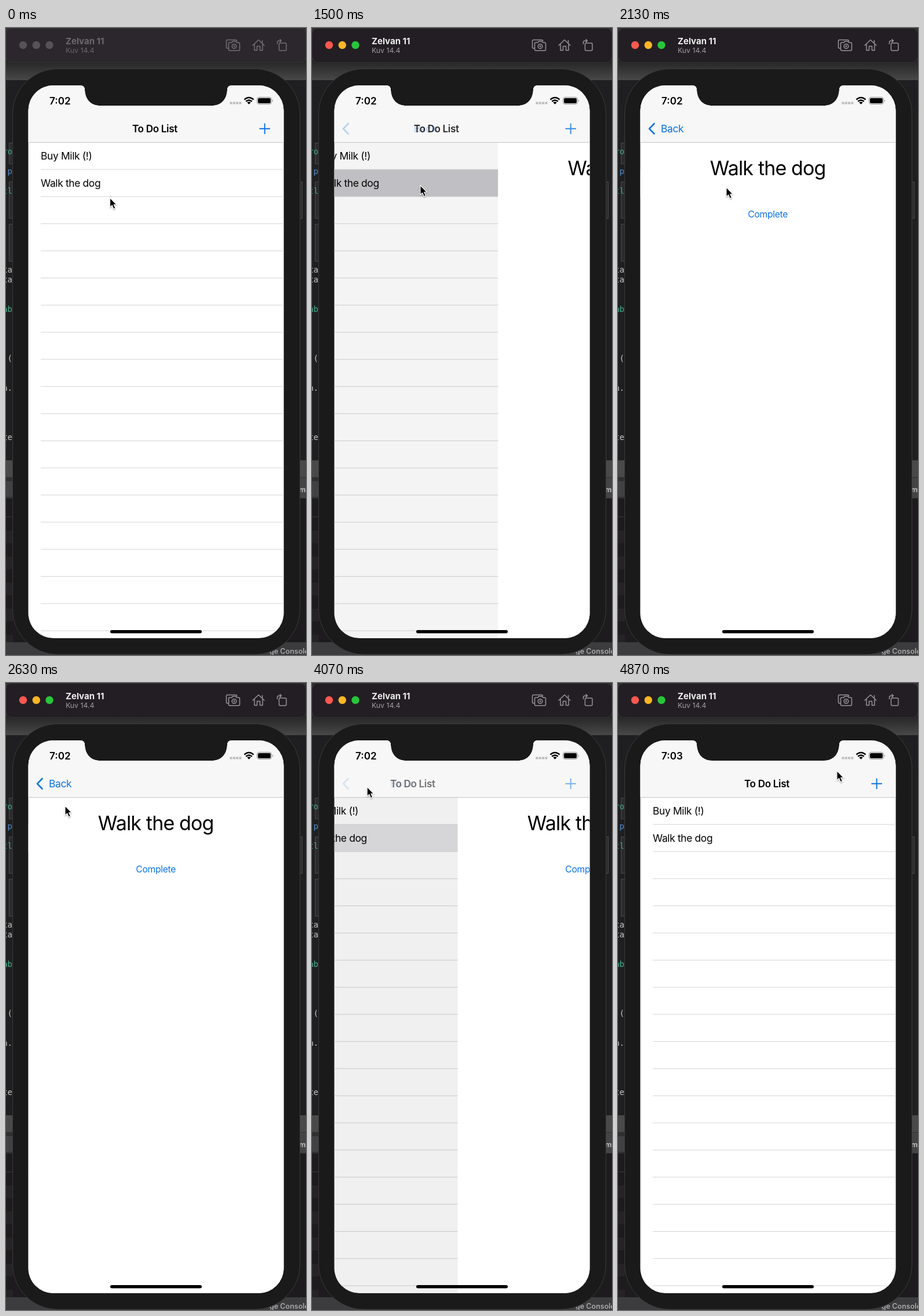
An HTML page for the animation above (4910 ms loop, 518x1082 px).

```html
<!DOCTYPE html>
<html lang="en">
<head>
<meta charset="utf-8">
<title>To Do List</title>
<style>
  html, body { margin: 0; width: 100%; height: 100%; overflow: hidden; background: #1f1f21; }
  svg { display: block; width: 100vw; height: 100vh; }
  text { font-family: Inter, sans-serif; font-size: 17.4px; letter-spacing: -.02em; white-space: pre; }
  .code { font: 14px "DejaVu Sans Mono", monospace; letter-spacing: 0; text-anchor: end; }
  .semi { font-weight: 600; font-size: 17.1px; }
  .line { fill: none; stroke-linecap: round; stroke-linejoin: round; }
  .blue { fill: #0b72e0; }
</style>
</head>
<body>
<svg viewBox="0 0 518 1082" preserveAspectRatio="none">
  <defs>
    <clipPath id="screen">
      <path d="M82 99H128Q136 99 136 107C137 124 147 134 163 134H355C371 134 381 124 382 107Q382 99 390 99H436A43.5 43.5 0 0 1 479.500 142.500V1009.500A43.500 43.500 0 0 1 436 1053H82A43.500 43.500 0 0 1 38.500 1009.500V142.500A43.500 43.500 0 0 1 82 99Z"/>
    </clipPath>
    <linearGradient id="shade" x2="0" y2="1">
      <stop stop-color="#242424"/><stop offset="1" stop-color="#484848"/>
    </linearGradient>
    <filter id="soft" x="-50%" y="-30%" width="220%" height="180%">
      <feDropShadow dx="0" dy="1.5" stdDeviation="1.3" flood-opacity=".35"/>
    </filter>
  </defs>

  <!-- editor behind the device -->
  <rect width="518" height="1082" fill="#1f1f21"/>
  <rect width="518" height="60" fill="#303030"/>
  <rect y="56" width="518" height="34" fill="url(#shade)"/>
  <g fill="#2b2b2d" stroke="#49494b">
    <rect x="5.500" y="198.500" width="40" height="36"/>
    <rect x="5.500" y="265.500" width="506" height="63"/>
    <rect x="5.500" y="338.500" width="40" height="64"/>
  </g>
  <g id="code" fill="#c9c9cb"></g>
  <rect y="746" width="518" height="29" fill="#494949"/>
  <rect y="775" width="518" height="37" fill="#303032"/>
  <rect y="782" width="12" height="27" fill="#414143"/>
  <rect x="500" y="776" width="18" height="35" fill="#444446"/>
  <text x="506" y="801" fill="#c6c6c6" style="font-size:12.500px;font-weight:600">mma</text>
  <rect y="812" width="518" height="248" fill="#1d1b1d"/>
  <g id="stripes" fill="#262225"></g>
  <path d="M0 843.500H12" stroke="#3b383b"/>
  <rect y="1060" width="518" height="22" fill="#3c3c3e"/>
  <text x="455" y="1080" fill="#a9a9ab" style="font-size:12.500px;font-weight:600;letter-spacing:0">ge Console</text>

  <!-- window title bar -->
  <rect id="bar" y=".5" width="518" height="59" rx="10" stroke="#3d393e" stroke-width=".7"/>
  <g id="lights">
    <circle cx="29.500" cy="29.500" r="6.700"/><circle cx="52.300" cy="29.500" r="6.700"/><circle cx="75" cy="29.500" r="6.700"/>
  </g>
  <text id="device" x="103" y="27.500" style="font-size:15px;font-weight:700;letter-spacing:0">Zelvan 11</text>
  <text id="system" x="103" y="43" style="font-size:12.300px;letter-spacing:0">Kuv 14.4</text>
  <g id="icons" class="line" stroke-width="1.500">
    <path d="M384 35H382.500Q380.500 35 380.500 33V22.500Q380.500 20.500 382.500 20.500H396.500Q398.500 20.500 398.500 22.500"/>
    <path d="M386.500 25H390L391.500 23H397L398.500 25H401.500Q403.500 25 403.500 27V37Q403.500 39 401.500 39H386.500Q384.500 39 384.500 37V27Q384.500 25 386.500 25Z"/>
    <circle cx="394" cy="31.500" r="3.800"/><circle cx="394" cy="31.500" r=".7"/>
    <path d="M426 30L436 20.500L446 30M429 28V38.500H433.500V31.500H438.500V38.500H443V28M442.500 25.500V21.500"/>
    <rect x="471.500" y="26" width="12.500" height="13" rx="2"/>
    <path d="M468.500 27.500V25Q468.500 22 471.500 22H475M473 19.500L475.500 22L473 24.500"/>
  </g>

  <!-- device -->
  <rect x="11.500" y="70.500" width="496" height="1010.500" rx="78" fill="#1a1a1a" stroke="#3b3b3b"/>
  <g clip-path="url(#screen)">
    <rect x="38" y="99" width="442" height="955" fill="#fff"/>
    <g id="list">
      <rect id="selected" x="38.500" y="244.100" width="441" height="46.800" fill="#c9c8cc"/>
      <g id="rules" stroke="#d4d4d6"></g>
      <text x="60" y="227">Buy Milk (!)</text>
      <text x="60" y="274">Walk the dog</text>
    </g>
    <rect id="dim" x="38" y="197" width="442" height="857"/>
    <g id="detail">
      <rect x="38.500" y="197" width="442" height="857" fill="#fff"/>
      <text x="258.700" y="253.500" text-anchor="middle" style="font-size:34px;letter-spacing:-.025em">Walk the dog</text>
      <text x="258.700" y="327" text-anchor="middle" class="blue" style="font-size:15.700px">Complete</text>
    </g>
    <rect x="38" y="99" width="442" height="98" fill="#f7f7f7"/>
    <path d="M38 197.400H480" stroke="#c3c3c5"/>
    <path id="chevron" class="line" d="M62.500 165L54 173.800L62.500 182.500" stroke="#0b72e0" stroke-width="2.600"/>
    <text id="back" x="74" y="180" class="blue">Back</text>
    <text id="title" x="218" y="180" class="semi">To Do List</text>
    <path id="plus" d="M437.500 173.800H456M446.700 164.500V183" stroke="#0b72e0" stroke-width="1.900"/>
    <text id="clock" x="75" y="132" class="semi" style="letter-spacing:0"></text>
    <path d="M386.500 129.500H406.500" stroke="#bcbcbe" stroke-width="4" stroke-dasharray="4 1.300"/>
    <g class="line" stroke="#000" stroke-width="2.500" style="stroke-linecap:butt">
      <path d="M411.500 123.600Q419.500 116.400 427.500 123.600M414.300 126.800Q419.500 122.200 424.700 126.800"/>
    </g>
    <path d="M416.300 128.500Q419.500 126 422.700 128.500L419.500 131.800Z"/>
    <rect x="433.500" y="119.500" width="25" height="12" rx="3.600" fill="none" stroke="#8c8c8c"/>
    <rect x="435" y="121" width="22" height="9" rx="2.200"/>
    <path d="M460 123.500Q462 125.500 460 127.700Z" fill="#8c8c8c"/>
    <rect x="180" y="1039" width="158" height="5.400" rx="2.700"/>
  </g>

  <path id="cursor" filter="url(#soft)" stroke="#fff" stroke-width="1.100" stroke-linejoin="round"
        d="M0 0V16.200L3.700 12.900L6.400 19.200L9.400 18L6.700 11.800H11.500Z"/>
</svg>
<script>
const LOOP = 4910, PUSH = 1432, POP = 3982;
const WIDTH = 441, ROW = 46.82;
const $ = id => document.getElementById(id);
const set = (id, attrs) => {
  for (const name in attrs) $(id).setAttribute(name, attrs[name]);
};
const shift = (id, x, y = 0) => set(id, { transform: `translate(${x} ${y})` });

$('code').innerHTML = [
  ['ro', 218, '#43a58d'], ['p', 252, '#548fd0'], ['tl', 286, '#43a58d'], ['ta', 422], ['ta', 439],
  ['ab', 490, '#43b08d'], ['.(', 575], ['n.', 626], ['te', 711]
].map(([word, y, color]) =>
  `<text class="code" x="11" y="${y}"${color ? ` fill="${color}"` : ''}>${word}</text>`).join('');

$('stripes').innerHTML = Array.from({ length: 5 }, (_, i) =>
  `<rect y="${867 + i * 45}" width="12" height="22"/>`).join('');

$('rules').innerHTML = Array.from({ length: 18 }, (_, i) => {
  const y = 197.3 + ROW * (i + 1);
  return `<path d="M60 ${y}H480"/>`;
}).join('');

// Critically damped spring, 0 to 1, as used for navigation transitions.
function spring(ms) {
  const x = Math.max(0, ms) * 0.01826;
  return 1 - (1 + x) * Math.exp(-x);
}

const pointer = [
  [0, 179.5, 293], [250, 179.5, 293], [1050, 187, 271.5], [1520, 187, 271.5], [1700, 187, 275],
  [2230, 187, 275], [2600, 102, 212], [3000, 102, 212], [3270, 97, 196], [3650, 91.5, 172.5],
  [4030, 91.5, 172.5], [4300, 115.5, 217], [4830, 358, 170], [4870, 378, 151.5]
];

function pointerAt(t) {
  const next = pointer.findIndex(([time]) => time > t);
  if (next < 0) return pointer[pointer.length - 1].slice(1);
  const [t0, x0, y0] = pointer[next - 1], [t1, x1, y1] = pointer[next];
  const k = (t - t0) / (t1 - t0);
  return [x0 + (x1 - x0) * k, y0 + (y1 - y0) * k];
}

function drawWindow(active) {
  set('bar', { fill: active ? '#231e23' : '#2b272c' });
  set('device', { fill: active ? '#f0eff0' : '#6d696e' });
  set('system', { fill: active ? '#a09ca0' : '#69656a' });
  set('icons', { stroke: active ? '#979398' : '#747075' });
  const colors = active ? ['#fe5850', '#fdb625', '#27c53b'] : Array(3).fill('#565257');
  [...$('lights').children].forEach((light, i) => light.setAttribute('fill', colors[i]));
}

function draw(t) {
  const push = spring(t - PUSH) - spring(t - POP);
  const label = spring(t - PUSH - 10) - spring(t - POP - 10);
  const pressed = t >= 3900 ? 0.25 : 1;
  const leaving = 1 - label ** 1.4;

  drawWindow(t >= 1300);
  shift('list', -0.3 * WIDTH * push);
  shift('detail', WIDTH * (1 - push));
  set('dim', { opacity: 0.115 * push });
  set('selected', { opacity: t < 1390 ? 0 : t < POP ? 1 : push });

  shift('title', -144 * label);
  shift('back', 144 * (1 - label));
  set('title', { opacity: leaving });
  set('plus', { opacity: leaving });
  set('back', { opacity: label * pressed });
  set('chevron', { opacity: label * pressed });

  $('clock').textContent = t < 4150 ? '7:02' : '7:03';
  shift('cursor', ...pointerAt(t));
}

function tick() {
  draw(performance.now() % LOOP);
  requestAnimationFrame(tick);
}
tick();
</script>
</body>
</html>
```
